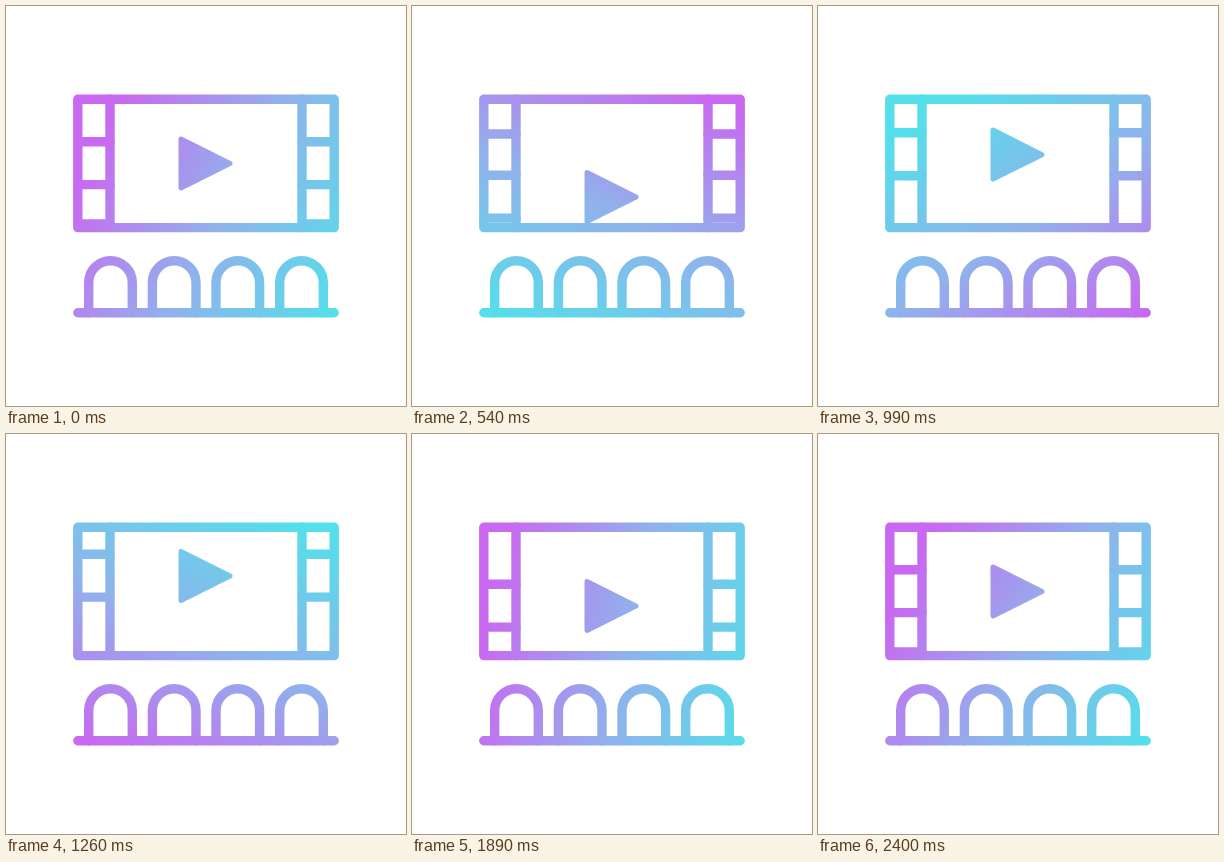
An HTML page for the animation above (4430 ms loop, 400 px wide and 400 px high).

```html
<!DOCTYPE html>
<html lang="en">
<head>
<meta charset="utf-8">
<title>Cinema</title>
<style>
  html, body { margin: 0; width: 100%; height: 100%; overflow: hidden; background: #fff; }
  svg { display: block; width: 100vw; height: 100vh; }
  .line { fill: none; stroke: #fff; stroke-width: 9.4; stroke-linecap: round; stroke-linejoin: round; }
  .play { fill: #fff; stroke: #fff; stroke-width: 5; stroke-linejoin: round; }
</style>
</head>
<body>
<svg viewBox="0 0 400 400">
  <defs>
    <linearGradient id="tint" gradientUnits="userSpaceOnUse" x1="70" y1="213" x2="360" y2="213">
      <stop offset="0" stop-color="#c968f0"/>
      <stop offset=".5" stop-color="#90b2ec"/>
      <stop offset="1" stop-color="#54dfea"/>
    </linearGradient>
    <clipPath id="screen"><rect x="72" y="93" width="256" height="124"/></clipPath>
    <path id="seat" d="M82.7 306.8V276.5a21.8 21.8 0 0 1 43.6 0V306.8"/>
    <path id="play" d="M175 133L224 157.6L175 182Z"/>
    <mask id="icon" maskUnits="userSpaceOnUse" x="0" y="0" width="400" height="400">
      <g class="line">
        <rect x="71.8" y="93.2" width="256.4" height="128.4"/>
        <path d="M104 93.2V221.6M296 93.2V221.6M71.8 306.8H328.2"/>
        <use href="#seat"/>
        <use href="#seat" x="63.7"/>
        <use href="#seat" x="127.3"/>
        <use href="#seat" x="191"/>
      </g>
      <g clip-path="url(#screen)">
        <g id="film">
          <path class="line" d="M72 135.7H104M72 178.6H104M72 218H104M72 259.2H104M72 302.1H104
            M296 135.7H328M296 178.6H328M296 218H328M296 259.2H328M296 302.1H328"/>
          <use class="play" href="#play"/>
          <use class="play" href="#play" y="123.5"/>
        </g>
      </g>
    </mask>
  </defs>
  <rect width="400" height="400" fill="url(#tint)" mask="url(#icon)"/>
</svg>
<script>
const LOOP = 4430, MOVE = 2400, STEP = 30;
const times = [0, 270, 540, 780, 1260, 1890, MOVE];
const film = document.getElementById('film');
const tint = document.getElementById('tint');

// Smooth curve through the poses, without extra overshoot between them
function curve(values) {
  const rate = times.slice(1).map((t, i) => (values[i + 1] - values[i]) / (t - times[i]));
  const slope = values.map((_, i) => {
    const a = rate[i - 1], b = rate[i];
    return a * b > 0 ? 2 * a * b / (a + b) : 0;
  });
  return t => {
    let i = 0;
    while (i < times.length - 2 && t > times[i + 1]) i++;
    const span = times[i + 1] - times[i];
    const u = (t - times[i]) / span, v = 1 - u;
    return v * v * (1 + 2 * u) * values[i] + u * u * (1 + 2 * v) * values[i + 1]
      + span * u * v * (v * slope[i] - u * slope[i + 1]);
  };
}

const scroll = curve([0, -9.5, -90, -121.5, -139, 14.5, 0]);
const angle = curve([28, 57, 114, 180, 295, 372, 388]);

function draw() {
  const now = performance.now() % LOOP;
  const t = Math.min(Math.floor(now / STEP) * STEP, MOVE);
  film.setAttribute('transform', `translate(0 ${scroll(t)})`);
  tint.setAttribute('gradientTransform', `rotate(${angle(t)} 215 213)`);
  requestAnimationFrame(draw);
}
draw();
</script>
</body>
</html>
```
